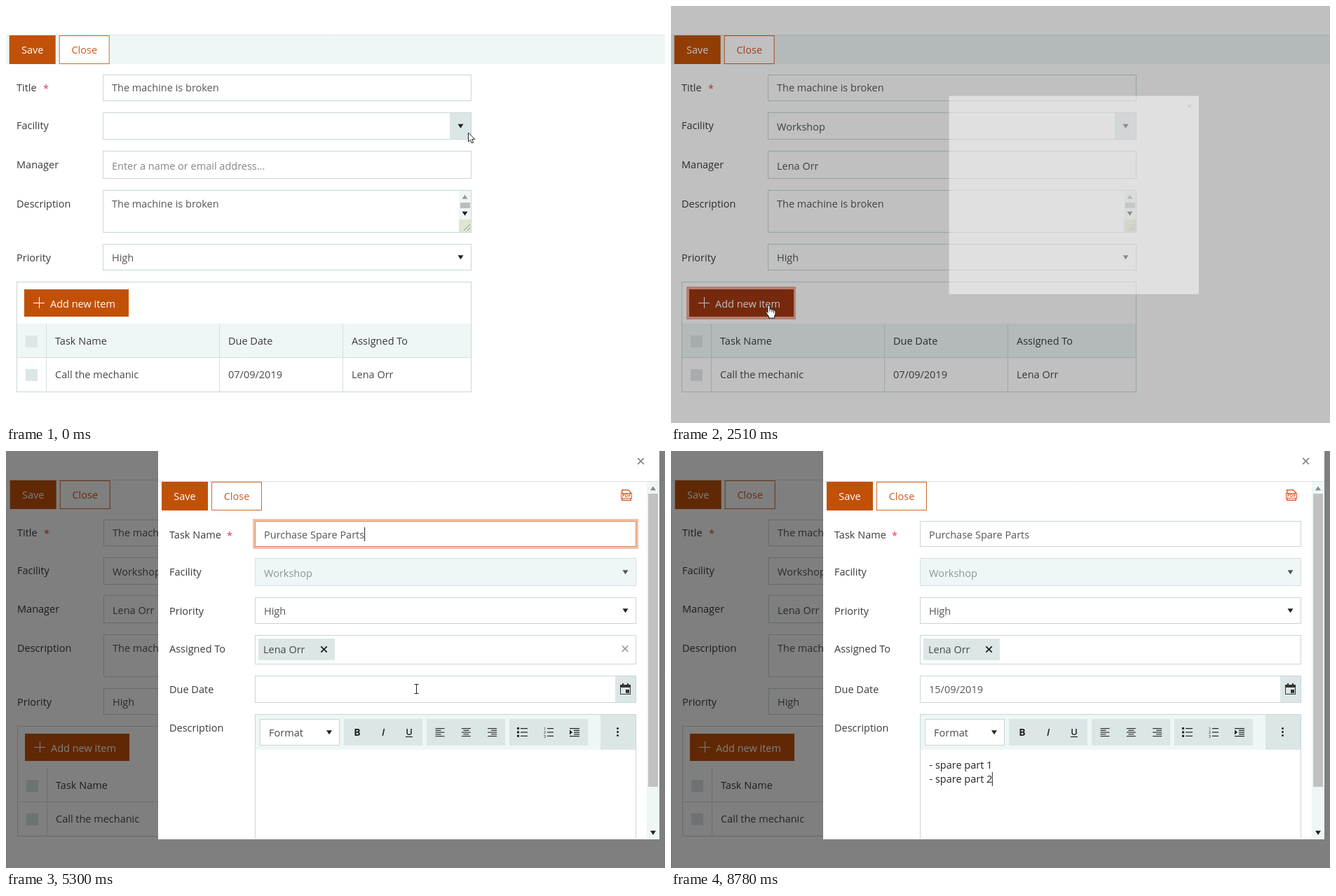
An HTML page with a canvas that plays this animation: 940x596 px, repeating every 9.18 s.

```html
<!DOCTYPE html>
<html lang="en">
<head>
<meta charset="utf-8">
<title>Maintenance request form</title>
<style>
html, body { margin: 0; width: 100%; height: 100%; overflow: hidden; background: #fff; }
canvas { display: block; width: 940px; height: 596px; }
</style>
</head>
<body>
<canvas id="stage" width="940" height="596"></canvas>
<script>
const g = document.getElementById('stage').getContext('2d');
const LOOP = 9180;
const FONT = '"Open Sans", "Noto Sans", sans-serif';
const PERSON = 'Lena Orr';
const TASK = 'Purchase Spare Parts';
const NOTES = '- spare part 1\n- spare part 2';
const ORANGE = [193, 81, 8], HOVER = [172, 68, 12], PRESSED = [156, 54, 16];
const LINE = '#c7d6da', GREY = '#dde6e7', TINT = '#eef7f6', INK = '#3a3a3a', VALUE = '#565656';

// Pointer path: time, x, y, shape
const PATH = [
  [0, 659, 181, 'arrow'], [60, 659, 181, 'arrow'], [150, 634, 175, 'beam'], [240, 617, 172, 'beam'],
  [760, 617, 172, 'beam'], [840, 614, 200, 'hand'], [1150, 600, 298, 'hand'], [1390, 600, 298, 'hand'],
  [1480, 540, 320, 'arrow'], [1800, 158, 418, 'hand'], [1930, 139, 427, 'hand'],
  [2890, 139, 427, 'hand'], [3020, 575, 164, 'arrow'], [3340, 575, 164, 'arrow'], [3430, 578, 136, 'beam'],
  [3550, 585, 119, 'beam'], [5150, 585, 119, 'beam'], [5300, 585, 340, 'beam'], [5340, 585, 340, 'beam'],
  [5650, 870, 342, 'hand'], [5750, 882, 341, 'hand'], [6050, 882, 341, 'hand'], [6520, 627, 520, 'hand'],
  [6720, 636, 540, 'hand'], [6960, 636, 540, 'hand'], [7080, 628, 525, 'beam'], [7400, 600, 491, 'beam'],
  [8150, 600, 491, 'beam'], [8300, 690, 380, 'arrow'], [8600, 878, 70, 'arrow'], [8770, 878, -20, 'arrow'],
  [LOOP, 878, -20, 'arrow']
];

const clamp = v => Math.max(0, Math.min(1, v));
const ramp = (t, a, b) => clamp((t - a) / (b - a));
const smooth = p => p * p * (3 - 2 * p);
const easeOut = p => 1 - (1 - p) ** 3;
const mix = (a, b, p) => `rgb(${a.map((v, i) => Math.round(v + (b[i] - v) * p))})`;

// CSS "ease" curve, solved by bisection
function ease(p) {
  let lo = 0, hi = 1;
  for (let i = 0; i < 20; i++) {
    const s = (lo + hi) / 2, r = 1 - s;
    if (3 * r * r * s * .25 + 3 * r * s * s * .25 + s ** 3 < p) lo = s; else hi = s;
  }
  const r = 1 - lo;
  return 3 * r * r * lo * .1 + 3 * r * lo * lo + lo ** 3;
}

function box(x, y, w, h, fill, stroke) {
  if (fill) { g.fillStyle = fill; g.fillRect(x, y, w, h); }
  if (stroke) {
    g.strokeStyle = stroke; g.lineWidth = 1;
    g.strokeRect(x + .5, y + .5, w - 1, h - 1);
  }
}
function text(s, x, y, color = INK, align = 'left', size = 14.5, style = '') {
  g.font = `${style} ${size}px ${FONT}`;
  g.textAlign = align;
  g.fillStyle = color;
  g.fillText(s, x, y);
}
function line(x1, y1, x2, y2, color, width = 1) {
  g.strokeStyle = color; g.lineWidth = width;
  g.beginPath(); g.moveTo(x1, y1); g.lineTo(x2, y2); g.stroke();
}
function poly(pts, fill, stroke, width = 1) {
  g.beginPath();
  for (let i = 0; i < pts.length; i += 2) g.lineTo(pts[i], pts[i + 1]);
  g.closePath();
  if (fill) { g.fillStyle = fill; g.fill(); }
  if (stroke) { g.strokeStyle = stroke; g.lineWidth = width; g.stroke(); }
}
const down = (x, y, r = 4, c = '#222') => poly([x - r, y - r * .7, x + r, y - r * .7, x, y + r * .8], c);
const up = (x, y, r = 4, c = '#222') => poly([x - r, y + r * .7, x + r, y + r * .7, x, y - r * .8], c);
function cross(x, y, r, color, width) {
  line(x - r, y - r, x + r, y + r, color, width);
  line(x - r, y + r, x + r, y - r, color, width);
}
function halo(x, y, w, h, a = 1) {
  if (a <= 0) return;
  g.save();
  g.globalAlpha *= a;
  g.strokeStyle = '#f4c2a6'; g.lineWidth = 3;
  g.strokeRect(x - 1.5, y - 1.5, w + 3, h + 3);
  box(x, y, w, h, null, '#d98a62');
  g.restore();
}
function buttons(x, y) {
  box(x, y, 66, 41, `rgb(${ORANGE})`);
  text('Save', x + 33, y + 25.5, '#fff', 'center');
  box(x + 71, y, 72, 41, '#fff', '#d0692f');
  text('Close', x + 107, y + 25.5, '#cb5a22', 'center');
}
function caret(x, y, h = 20) { line(x + .5, y, x + .5, y + h, '#222'); }

function pointer(t) {
  let i = 0;
  while (i < PATH.length - 2 && t >= PATH[i + 1][0]) i++;
  const [ta, xa, ya, shape] = PATH[i], [tb, xb, yb] = PATH[i + 1], p = smooth(ramp(t, ta, tb));
  return { x: xa + (xb - xa) * p, y: ya + (yb - ya) * p, shape };
}

function drawPointer({ x, y, shape }) {
  g.save();
  g.translate(Math.round(x), Math.round(y));
  if (shape === 'arrow') {
    poly([.5, 0, .5, 13, 3.4, 10.3, 5.4, 15, 7.6, 14, 5.6, 9.5, 9.7, 9.3], '#fff', '#222');
  } else if (shape === 'beam') {
    line(.5, -6, .5, 6, '#222');
    for (const s of [-6.5, 6.5]) line(-2.5, s, 3.5, s, '#222');
  } else {
    g.beginPath();
    g.moveTo(-1, 11);
    g.lineTo(-1, 1.5); g.quadraticCurveTo(.6, -.8, 2, 1.5);
    g.lineTo(2, 6); g.quadraticCurveTo(4, 5, 5, 7);
    g.quadraticCurveTo(7, 6, 7.6, 8); g.quadraticCurveTo(10, 7.4, 10, 9.5);
    g.lineTo(10, 13); g.quadraticCurveTo(9.6, 15, 8.5, 16.5);
    g.lineTo(8.5, 19); g.lineTo(.5, 19); g.lineTo(.5, 17);
    g.lineTo(-4, 10.8); g.quadraticCurveTo(-3.6, 8.6, -1, 11);
    g.closePath();
    g.fillStyle = '#fff'; g.fill();
    g.strokeStyle = '#222'; g.lineWidth = 1.1; g.stroke();
    for (const [lx, ly] of [[2, 6], [5, 7], [7.6, 8]]) line(lx, ly, lx, ly + 3.5, '#222');
  }
  g.restore();
}

function drawPage(t, dim) {
  const shifted = t >= 3020;
  const tint = dim === 1 ? '#fff' : TINT;
  const chosen = t >= 1330;
  box(0, 0, 940, 596, '#fff');
  g.save();
  if (shifted) {
    line(.5, 41, .5, 596, '#dbe6e8');
    g.translate(1, 0);
  }
  box(-1, 41, 941, 42, tint);
  line(-1, 41.5, 940, 41.5, '#d9e6e7');
  buttons(4.7, 42);

  text('Title', 15, 122);
  text('*', 53, 123, '#e0393e');
  box(138, 98, 526, 38, '#fff', LINE);
  text('The machine is broken', 151, 122, VALUE);

  text('Facility', 15, 176);
  box(138, 152, 526, 39, '#fff', chosen && t < 2450 ? '#e6bf9f' : LINE);
  box(633, 153, 30, 37, GREY);
  down(648.5, 171.5);
  if (chosen) text('Workshop', 151, 177.5, VALUE);
  if (t < 1360) halo(138, 152, 526, 39, ramp(t, 460, 580));

  if (shifted) g.translate(0, -1);
  text('Manager', 15, 232);
  box(138, 207, 526, 40, '#fff', LINE);
  if (t < 1600) text('Enter a name or email address...', 151, 233.5, '#858585');
  else text(PERSON, 151, 233.5, VALUE);

  text('Description', 15, 288);
  box(138, 263, 526, 61, '#fff', LINE);
  text('The machine is broken', 151, 288, VALUE);
  box(646, 264, 17, 41, TINT);
  up(654.5, 273, 4, '#9a9a9a');
  box(648, 281, 14, 8, '#bdbdbd');
  down(654.5, 296.5);
  box(646, 305, 17, 18, '#dfe6cf');
  line(653, 321, 662, 312, '#888');
  line(658, 321, 662, 317, '#888');

  text('Priority', 15, 364.5);
  box(138, 340, 526, 38, '#fff', LINE);
  text('High', 151, 364.5, VALUE);
  down(648.5, 359);

  box(15, 394, 649, 158, '#fff', LINE);
  drawAddButton(t);
  box(16, 454, 647, 48, tint);
  for (const x of [57.5, 304.5, 480.5]) line(x, 454, x, 551, '#d3dfe2');
  line(16, 502.5, 663, 502.5, '#d3dfe2');
  for (const y of [471, 519]) box(28, y, 17, 17, GREY);
  ['Task Name', 'Due Date', 'Assigned To'].forEach((s, i) => text(s, [70, 317, 493][i], 483.5));
  ['Call the mechanic', '07/09/2019', PERSON].forEach((s, i) => text(s, [70, 317, 493][i], 531.5, '#484848'));
  g.restore();

  drawFacilities(t);
  if (dim > 0) box(0, 0, 940, 596, `rgba(0,0,0,${dim / 2})`);
}

function drawAddButton(t) {
  let color = mix(ORANGE, HOVER, ramp(t, 1800, 1930));
  if (t > 2130) color = mix(HOVER, PRESSED, ramp(t, 2130, 2330));
  if (t > 2600) color = mix(PRESSED, ORANGE, ramp(t, 2600, 2800));
  const glow = ramp(t, 2300, 2500) * (1 - ramp(t, 2600, 2780));
  if (glow > 0) {
    g.save();
    g.globalAlpha = glow;
    box(22, 401, 156, 47, '#f2a994');
    g.restore();
  }
  box(26, 405, 149, 39, color);
  line(39, 424.5, 55, 424.5, '#fff');
  line(47.5, 416, 47.5, 432, '#fff');
  text('Add new item', 63, 431, '#fff');
}

function drawFacilities(t) {
  const open = easeOut(ramp(t, 560, 760)) * (1 - ramp(t, 1270, 1360));
  if (open <= 0) return;
  const h = 132;
  g.save();
  g.beginPath(); g.rect(138, 192, 526, h * open); g.clip();
  g.translate(0, -h * (1 - open));
  box(138, 192, 526, h, '#fff', LINE);
  const { y } = pointer(t);
  ['Office', 'Warehouse', 'Workshop'].forEach((s, i) => {
    const top = 193 + i * 43.3;
    if (y >= top && y < top + 43.3) box(139, top, 524, 43.3, GREY);
    text(s, 151, top + 27, VALUE);
  });
  g.restore();
}

function drawPopup(t, p) {
  g.save();
  if (p < 1) {
    g.globalAlpha = p;
    g.translate(574.5, 270); g.scale(p, p); g.translate(-574.5, -270);
  }
  const late = t >= 3020;
  const [x, w, h] = late ? [217, 715, 570] : [216, 718, 571];
  box(x, -15, w, h, '#fff');
  line(x, 43.5, x + w, 43.5, '#dcdfe0');
  cross(late ? 905.5 : 907, 14.5, 4.3, '#858585', 1.7);
  if (t > 2760 && t < 3050) {
    const turn = (t - 2870) / 1000 * Math.PI * 2;
    g.strokeStyle = '#1296f5'; g.lineWidth = 4;
    for (const a of [turn - Math.PI / 2, turn + Math.PI / 2]) {
      g.beginPath(); g.arc(574.5, 166.5, 18.5, a, a + Math.PI / 2); g.stroke();
    }
  }
  g.restore();
}

function drawForm(t) {
  g.save();
  g.beginPath(); g.rect(217, 44, 715, 510); g.clip();
  buttons(222, 44);
  drawFileIcon();

  text('Task Name', 233, 124.5);
  text('*', 315, 126, '#e0393e');
  box(355, 100, 544, 37, '#fff', LINE);
  const typed = TASK.slice(0, Math.ceil(20 * ramp(t, 4925, 5280)));
  text(typed, 368, 124.5, VALUE);
  if (t >= 3500 && t < 5850) {
    halo(355, 100, 544, 37, ramp(t, 3480, 3640));
    if (t < 3970 || t >= 4470) caret(368 + (typed ? g.measureText(typed).width : 0), 109);
  }

  text('Facility', 233, 178);
  box(355, 153, 544, 40, TINT, '#d3dfe2');
  text('Workshop', 368, 179.5, '#8d9596');
  down(883.5, 173, 4, '#555');

  text('Priority', 233, 233.5);
  box(355, 209, 544, 38, '#fff', LINE);
  text('High', 368, 233.5, VALUE);
  down(883.5, 228);

  text('Assigned To', 233, 287.5);
  box(355, 263, 544, 42, '#fff', LINE);
  box(360, 268, 109, 31, GREY);
  text(PERSON, 367, 289, '#484848');
  cross(453.5, 283.5, 4.2, '#222', 1.9);
  const near = pointer(t - 50);
  if (near.y > 263 && near.y < 305 && near.x > 355 && near.x < 899) cross(883, 282.5, 4.2, '#8f9699', 1.6);

  drawDue(t);
  if (t >= 3110) drawEditor(t);
  drawCalendar(t);

  const long = t >= 5940 && t < 6960;
  box(914, 44, 18, 510, TINT);
  box(916, 61, 14, long ? 349 : 419, '#c1c1c1');
  up(923, 53.5, 4, '#8a8a8a');
  down(923, 545.5);
  g.restore();
}

function drawFileIcon() {
  const c = '#d4602f';
  poly([878.7, 55.7, 887.5, 55.7, 891.3, 59.5, 891.3, 70.3, 878.7, 70.3], '#fff', c, 1.5);
  box(877, 60, 16, 8, '#fff', c);
  text('PDF', 885, 66.4, c, 'center', 6.5, 'bold');
}

function drawDue(t) {
  const focus = ramp(t, 5850, 5950) * (1 - ramp(t, 7300, 7430));
  text('Due Date', 233, 345.5);
  box(355, 321, 544, 39, '#fff', LINE);
  box(869, 322, 29, 37, mix([221, 230, 231], [197, 205, 222], focus));
  halo(355, 321, 544, 39, focus);
  if (t >= 6790) text('15/09/2019', 368, 346, VALUE);
  else if (t >= 5880) caret(368, 330);
  box(876, 334, 15, 14, null, '#333');
  box(876, 334, 15, 4, '#333');
  box(879, 332, 2, 3, '#333');
  box(886, 332, 2, 3, '#333');
  box(884, 341, 5, 5, '#333');
}

function drawEditor(t) {
  text('Description', 233, 401);
  box(355, 376, 544, 200, '#fff', LINE);
  box(356, 377, 542, 50, TINT);
  box(362, 383, 114, 38, '#fff', LINE);
  text('Format', 375, 407.5, '#484848');
  down(461, 402);
  for (const x of [482, 600, 718]) box(x, 383, 112, 38, GREY);
  box(848, 377, 50, 50, GREY);
  text('B', 501, 407, '#222', 'center', 14, 'bold');
  text('I', 538, 407, '#222', 'center', 14, 'italic 600');
  text('U', 575, 406, '#222', 'center', 13, '600');
  line(570, 408.5, 580, 408.5, '#222', 1.2);
  [0, .5, 1].forEach((a, k) => {
    for (let i = 0; i < 5; i++) {
      const w = i % 2 ? 8 : 13;
      box(612.5 + k * 37.3 + (13 - w) * a, 396 + i * 2.75, w, 1.2, '#333');
    }
  });
  for (let i = 0; i < 3; i++) {
    const y = 396 + i * 5.4;
    box(729, y - 1, 3, 3, '#222');
    box(734, y, 10, 1.2, '#222');
    text(i + 1, 768.5, y + 3, '#222', 'center', 6);
    box(772, y, 9, 1.2, '#222');
    g.beginPath(); g.arc(872.5, 396.5 + i * 5, 1.5, 0, 7); g.fillStyle = '#222'; g.fill();
  }
  for (let i = 0; i < 5; i++) {
    const inner = i > 0 && i < 4;
    box(inner ? 810 : 804, 396 + i * 2.75, inner ? 8 : 14, 1.2, '#222');
  }
  poly([804, 398.5, 808, 402, 804, 405.5], '#222');

  if (t < 7450) return;
  const lines = NOTES.slice(0, Math.floor(NOTES.length * ramp(t, 7680, 8500))).split('\n');
  lines.forEach((s, i) => text(s, 368.5, 454 + i * 20, '#222'));
  caret(368 + g.measureText(lines[lines.length - 1]).width, 439 + (lines.length - 1) * 20);
}

function drawCalendar(t) {
  const open = easeOut(ramp(t, 5880, 6090)) * (1 - smooth(ramp(t, 6790, 6980)));
  if (open <= 0) return;
  const h = 335, { x, y } = pointer(t);
  g.save();
  g.beginPath(); g.rect(355, 363, 311, h * open); g.clip();
  g.translate(0, -h * (1 - open));
  box(355, 361, 310, h, '#fff', '#d3dfe2');
  box(356, 363, 308, 37, TINT);
  poly([378, 378, 378, 386, 371.5, 382], '#222');
  poly([643, 378, 643, 386, 649.5, 382], '#222');
  text('September 2019', 510, 387, '#333', 'center', 12.6, '600');
  ['MO', 'TU', 'WE', 'TH', 'FR', 'SA', 'SU'].forEach((s, i) => text(s, 378 + i * 44, 423.5, '#858585', 'center', 12.8));
  const col = Math.floor((x - 356) / 44), row = Math.floor((y - 436) / 43.3);
  for (let i = 0; i < 42; i++) {
    const c = i % 7, r = Math.floor(i / 7), cx = 378 + c * 44, cy = 462.5 + r * 43.3;
    const n = i - 5, inside = n > 0 && n <= 30;
    text(n <= 0 ? n + 31 : n > 30 ? n - 30 : n, cx, cy, inside ? '#303030' : '#858585', 'center', 14.7);
    if (n === 9) {
      g.strokeStyle = '#d0692f'; g.lineWidth = 2;
      g.strokeRect(357, 522, 42, 43);
    }
    if (open === 1 && c === col && r === row) {
      const w = n > 9 || n < 1 ? 17 : 8.5;
      box(cx - w / 2, cy + 1.5, w, 1, '#303030');
    }
  }
  g.restore();
}

function draw(t) {
  const p = t < 2408 ? 0 : ease(ramp(t, 2408, 2758));
  const shown = p > .999 ? 1 : p;
  drawPage(t, shown);
  if (shown > 0) drawPopup(t, shown);
  if (t >= 3050) drawForm(t);
  drawPointer(pointer(t));
}

let start = null;
function tick(now) {
  if (start === null) start = now;
  draw((now - start) % LOOP);
  requestAnimationFrame(tick);
}
draw(0);
requestAnimationFrame(tick);
</script>
</body>
</html>
```
